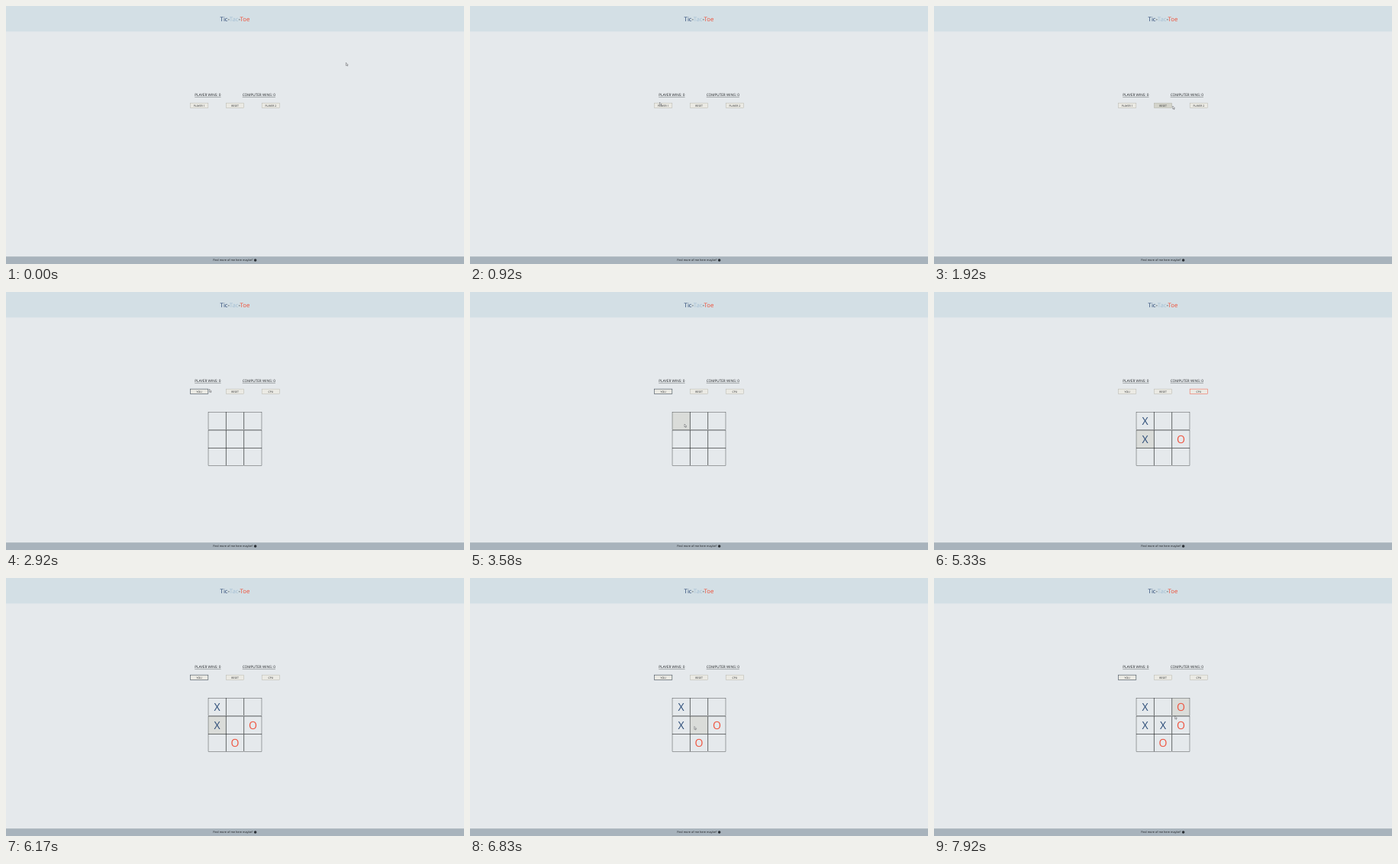
These frames come from a looping animation (600 px wide and 338 px high, 8000 ms). An HTML page:

```html
<!DOCTYPE html>
<html lang="en">
<head>
<meta charset="utf-8">
<title>Tic-Tac-Toe</title>
<style>
html, body { margin: 0; width: 100%; height: 100%; overflow: hidden; background: #e5e9ec; }
svg { display: block; width: 600px; height: 338px; }
text { font-family: "Open Sans", "Noto Sans", sans-serif; text-anchor: middle; text-rendering: geometricPrecision; fill: #1c1f22; }
.title { font-size: 7.75px; font-weight: 500; }
.score { font-size: 4.69px; }
.label { font-size: 3.44px; }
.foot { font-size: 3.75px; }
.mark { font-size: 14.06px; }
</style>
</head>
<body>
<svg viewBox="0 0 600 338">
  <rect width="600" height="33.4" fill="#d3dfe5"/>
  <rect y="328.2" width="600" height="9.8" fill="#a8b3bc"/>
  <text class="title" x="300" y="19.6"><tspan fill="#24406f">Tic</tspan>-<tspan fill="#a3bed3">Tac</tspan>-<tspan fill="#f04e36">Toe</tspan></text>
  <text class="score" x="264.4" y="117.9">PLAYER WINS: 0</text>
  <text class="score" x="331.3" y="117.9">COMPUTER WINS: 0</text>
  <path d="M247.2 119.3h34.4M309.7 119.3h43.2" stroke="#22262a" stroke-width=".35"/>
  <text class="foot" x="297.3" y="334.4">Find more of me here maybe?</text>
  <circle cx="326.6" cy="333" r="1.8" fill="#2b3036"/>
  <g id="buttons"></g>
  <g id="board"></g>
  <path id="cursor" d="M0 0V3.9L.95 3.1L1.6 4.5L2.2 4.2L1.6 2.9H2.8Z" fill="#f6f6f6" stroke="#33363a" stroke-width=".4"/>
</svg>
<script>
const LOOP = 8000, FPS = 12, CELL = 23.44, LEFT = 264.84, TOP = 157.5, LINE = .36;
const NAVY = '#2c4c78', RED = '#ef5540';
const START = 2660, REPLY = 500;
const $ = id => document.getElementById(id);

function add(parent, tag, attrs) {
  const el = document.createElementNS('http://www.w3.org/2000/svg', tag);
  for (const k in attrs) el.setAttribute(k, attrs[k]);
  return parent.appendChild(el);
}

const buttons = [0, 1, 2].map(i => {
  const x = 241.4 + i * 2 * CELL;
  return {
    x,
    box: add($('buttons'), 'rect', { x, y: 127.1, width: CELL, height: 6.4 }),
    label: add($('buttons'), 'text', { class: 'label', x: x + CELL / 2, y: 131.55 })
  };
});

const cells = Array.from({ length: 9 }, (_, i) => {
  const x = LEFT + i % 3 * CELL, y = TOP + Math.floor(i / 3) * CELL, size = CELL - LINE;
  return {
    box: add($('board'), 'rect', { x: x + LINE / 2, y: y + LINE / 2, width: size, height: size, stroke: '#17191b', 'stroke-width': LINE }),
    mark: add($('board'), 'text', { class: 'mark', x: x + CELL / 2, y: y + 16.9 })
  };
});

// Each turn: click time, clicked cell, answering cell
const moves = [[3830, 0, 5], [5330, 3, 7], [7000, 4, 2]].flatMap(([time, mine, reply]) => [
  { time, mark: 'X', cell: mine },
  { time: time + REPLY, mark: 'O', cell: reply }
]);

// Pointer legs: start and end time, where to, sideways bow
const legs = [
  [0, 1000, 244.5, 130, -45],
  [1250, 1600, 274, 112, 0],
  [1600, 2167, 340, 133, 7],
  [2167, 2580, 256, 131, 0],
  [2750, 3330, 308, 130, -6],
  [3330, 3583, 281, 173, 0],
  [3833, 4333, 306.6, 171.6, 0],
  [4750, 5170, 276, 195, 0],
  [6000, 6500, 321, 208, 8],
  [6500, 6833, 293.9, 194.5, 0],
  [7083, 7917, 315.6, 180.8, 6]
];

function pointerAt(t) {
  let x = 445.4, y = 74.2;
  for (const [from, to, toX, toY, bow] of legs) {
    if (t <= from) break;
    const k = Math.min(1, (t - from) / (to - from)), e = k * k * (3 - 2 * k);
    x += (toX - x) * e;
    y += (toY - y) * e + bow * Math.sin(Math.PI * e);
  }
  return [x, y];
}

function draw(t) {
  const [x, y] = pointerAt(t), playing = t >= START;
  const done = moves.filter(m => t >= m.time);
  const active = !playing ? -1 : done.length % 2 ? 2 : 0;
  const names = playing ? ['YOU', 'RESET', 'CPU'] : ['PLAYER 1', 'RESET', 'PLAYER 2'];

  buttons.forEach((b, i) => {
    const over = x >= b.x - .5 && x <= b.x + CELL + 1.5 && y > 126.8 && y < 133.8;
    const hot = over && !playing && i < 2;
    b.label.textContent = names[i];
    b.box.setAttribute('fill', hot ? '#d3d3ca' : '#ebeae4');
    b.box.setAttribute('stroke', i !== active ? '#a9a99f' : i ? RED : '#1f2c3c');
    b.box.setAttribute('stroke-width', i === active ? .5 : .4);
  });

  const col = Math.floor((x - LEFT) / CELL), row = Math.floor((y - TOP) / CELL);
  const inside = playing && col >= 0 && col < 3 && row >= 0 && row < 3;
  const hovered = inside ? row * 3 + col : -1;
  $('board').style.display = playing ? '' : 'none';
  cells.forEach((c, i) => {
    const move = done.find(m => m.cell === i);
    c.box.setAttribute('fill', i === hovered ? '#dadcd9' : 'none');
    c.mark.textContent = move ? move.mark : '';
    c.mark.style.fill = move && move.mark === 'O' ? RED : NAVY;
  });

  // the arrow vanishes over the player's own marks
  const covered = done.some(m => m.mark === 'X' && m.cell === hovered);
  $('cursor').style.display = covered ? 'none' : '';
  $('cursor').setAttribute('transform', `translate(${x} ${y})`);
}

const begin = performance.now();
function tick() {
  const t = (performance.now() - begin) % LOOP;
  const step = Math.floor((t + 5) * FPS / 1000) % (LOOP * FPS / 1000);
  draw(step * 1000 / FPS);
  requestAnimationFrame(tick);
}
tick();
</script>
</body>
</html>
```
